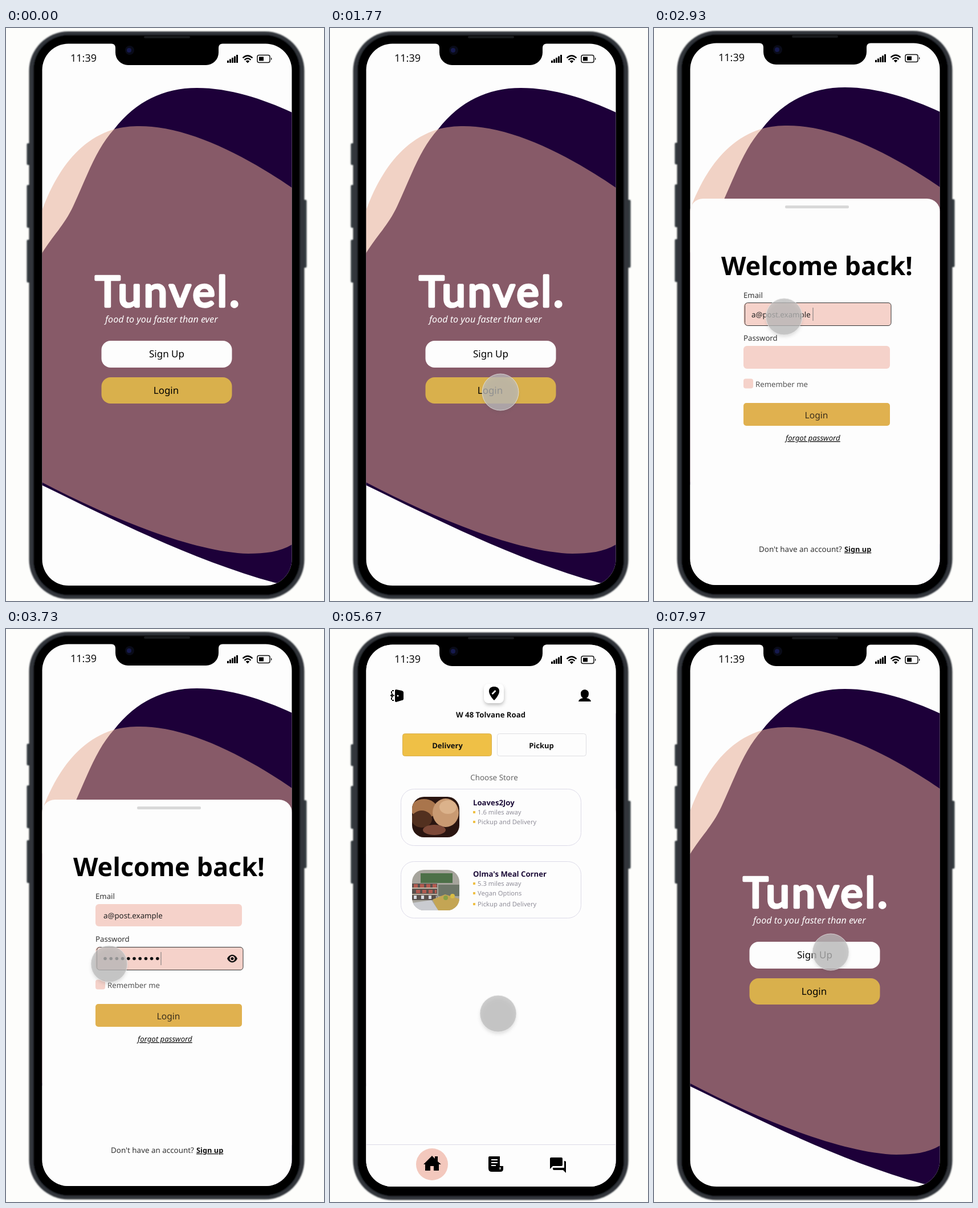
An HTML page that plays this animation: 558 px wide and 1004 px high, repeating every 8000 ms.

```html
<!DOCTYPE html>
<html lang="en">
<head>
<meta charset="utf-8">
<title>Food app prototype</title>
<style>
  html, body { margin: 0; width: 100%; height: 100%; overflow: hidden; background: #fdfdfb; }
  svg { display: block; width: 100%; height: 100%; }
  text { font-family: "Noto Sans", "Open Sans", sans-serif; text-rendering: geometricPrecision; }
  .mid { text-anchor: middle; }
  .semi { font-weight: 600; }
  .bold { font-weight: 700; }
  .ital { font-style: italic; }
  .line { text-decoration: underline; }
  .logo { font: 400 74px Lato, "Open Sans", sans-serif; letter-spacing: 4px; stroke: #fff; stroke-width: 4.5; stroke-linejoin: round; }
</style>
</head>
<body>
<svg viewBox="0 0 558 1004" preserveAspectRatio="none">
  <defs>
    <clipPath id="screenClip"><rect x="63.5" y="27.5" width="438" height="949.5" rx="46"/></clipPath>
    <clipPath id="breadClip"><rect x="144" y="294" width="83" height="71" rx="21"/></clipPath>
    <clipPath id="shelfClip"><rect x="144" y="422" width="83" height="71" rx="21"/></clipPath>
    <filter id="soft" x="-50%" y="-50%" width="200%" height="200%"><feGaussianBlur stdDeviation="3"/></filter>
    <filter id="edge"><feGaussianBlur stdDeviation=".8"/></filter>
  </defs>

  <g id="phone">
    <g filter="url(#edge)">
      <g fill="#343a3f">
        <rect x="36.500" y="202" width="8" height="38" rx="2"/>
        <rect x="36.500" y="275" width="8" height="75" rx="2"/>
        <rect x="36.500" y="371" width="8" height="75" rx="2"/>
        <rect x="519.500" y="301" width="8" height="119" rx="2"/>
      </g>
      <rect x="40.500" y="6" width="483" height="994.500" rx="69" fill="#30363b"/>
      <rect x="48" y="12" width="468" height="982" rx="62"/>
    </g>
    <rect x="63.5" y="27.5" width="438" height="949.5" rx="46" fill="#fdfdfd"/>

    <g clip-path="url(#screenClip)">
      <g id="splash">
        <path fill="#1d0039" d="M63 395C82 364 102 346 118 312C143 258 158 212 190 177C228 128 278 105 335 105C392 105 450 124 502 148V978L472 972C330 933 190 863 63 801Z"/>
        <path fill="#e6ab93" fill-opacity=".525" d="M63 320C84 262 122 198 188 178C204 173 220 172 235 172C320 172 420 224 502 280V905C480 918 455 921 425 921C330 918 190 862 63 796Z"/>
        <text class="mid logo" x="285" y="488" fill="#fff">Tunvel.</text>
        <text class="ital" x="174" y="516" font-size="16.1" fill="#fff">food to you faster than ever</text>
        <rect x="167.500" y="548" width="229" height="47" rx="16" fill="#fdfdfd"/>
        <rect x="167.500" y="612" width="229" height="46" rx="16" fill="#d9b04c"/>
        <g class="mid" font-size="17"><text x="282" y="577">Sign Up</text><text x="281" y="641">Login</text></g>
      </g>

      <g id="sheet">
        <rect x="63" y="300" width="439" height="720" rx="23" fill="#fdfdfd"/>
        <rect x="230" y="312" width="112" height="5" rx="2" fill="#d8d8d8"/>
        <text class="bold mid" x="286" y="434" font-size="45">Welcome back!</text>
        <g fill="#f5d2ca">
          <rect x="157" y="483" width="257" height="39" rx="6"/>
          <rect x="157" y="558" width="257" height="40" rx="6"/>
          <rect x="157" y="615.5" width="17" height="17" rx="4"/>
        </g>
        <g font-size="13.2" fill="#333">
          <text x="157" y="474">Email</text>
          <text x="157" y="549">Password</text>
          <text x="178" y="630" fill="#555">Remember me</text>
          <text x="184" y="919" font-size="13.4">Don't have an account?</text>
          <text class="bold line" x="334" y="919" font-size="12.8" fill="#111">Sign up</text>
          <text class="ital line" x="231" y="724" fill="#111">forgot password</text>
        </g>
        <rect x="157" y="658" width="257" height="40" rx="5" fill="#e0b14f"/>
        <text class="mid" x="285" y="685" font-size="15.6" fill="#3b2f1c">Login</text>
        <rect id="focus" x="159.5" width="256.5" height="40" rx="5" fill="#f5d2ca" stroke="#333"/>
        <text id="email" x="171" y="508" font-size="13.3" fill="#222">a@post.example</text>
        <g id="secret">
          <g id="dots"></g>
          <path fill="#111" fill-rule="evenodd" d="M388 578.5C392 569.500 402 569.500 406 578.5C402 587.500 392 587.500 388 578.5ZM392.500 578.5a4.500 4.500 0 1 0 9 0a4.500 4.500 0 1 0-9 0Z"/>
          <circle cx="397" cy="578.5" r="2.6" fill="#111"/>
        </g>
        <path id="caret" stroke="#777"/>
        <path id="check" fill="none" stroke="#222" stroke-width="1.8" d="M158 616.500h15v15h-15ZM160.500 619l10 10M170.500 619l-10 10"/>
      </g>

      <g id="home">
        <rect x="63" y="27" width="439" height="950" fill="#fdfdfd"/>
        <path d="M116 106l10 2q3 1 3 3v11q0 3-3 3l-10 3q-2 0-2-2v-18q0-2 2-2Z"/>
        <path fill="none" stroke="#000" stroke-width="2" d="M112 108h-3M108 109v4M108 120v4M109 125h3M113 116.500h-6M110 113.500l-3 3l3 3"/>
        <circle cx="119" cy="117" r="1.5" fill="#fff"/>
        <rect x="271" y="100" width="34" height="33" rx="8" fill="#777" opacity=".5" filter="url(#soft)"/>
        <rect x="270" y="96" width="35" height="34" rx="8" fill="#fff"/>
        <path d="M288 125C274 111 278 101 288 101S302 111 288 125Z"/>
        <path stroke="#fff" stroke-width="2.6" d="M284.500 114l6-6"/>
        <path d="M440 113c0-9 14-9 14 0q0 6-4 8q7 1 8 6h-22q1-5 8-6q-4-2-4-8Z"/>
        <text class="semi mid" x="282" y="155" font-size="13.2" fill="#111">W 48 Tolvane Road</text>
        <rect x="127.500" y="183.500" width="156" height="39" rx="4" fill="#efc046" stroke="#d9b04c"/>
        <rect x="293.500" y="183.500" width="156" height="39" rx="4" fill="#fdfdfd" stroke="#dedee2"/>
        <g class="semi mid" font-size="13" fill="#111"><text x="206" y="209">Delivery</text><text x="371" y="209">Pickup</text></g>
        <text class="mid" x="288" y="265" font-size="13.4" fill="#666">Choose Store</text>
        <g fill="#fdfdfd" stroke="#dcdae8">
          <rect x="124.500" y="280.500" width="316" height="99" rx="23"/>
          <rect x="124.500" y="407.500" width="316" height="99" rx="23"/>
          <path d="M63 903.500h439"/>
        </g>
        <g clip-path="url(#breadClip)">
          <rect x="144" y="294" width="83" height="71" fill="#2a1510"/>
          <ellipse cx="165" cy="315" rx="23" ry="17" fill="#a9754c"/>
          <ellipse cx="161" cy="333" rx="18" ry="15" fill="#52301f"/>
          <ellipse cx="203" cy="322" rx="23" ry="25" fill="#c99a72"/>
          <ellipse cx="207" cy="312" rx="15" ry="12" fill="#dbb28b"/>
          <ellipse cx="183" cy="352" rx="20" ry="9" fill="#7d4938"/>
        </g>
        <g clip-path="url(#shelfClip)">
          <rect x="144" y="422" width="83" height="71" fill="#a6a49c"/>
          <rect x="159" y="428" width="56" height="17" fill="#4d7048"/>
          <rect x="144" y="446" width="44" height="29" fill="#59504c"/>
          <path stroke="#c4b9a8" stroke-width="2" d="M144 454h44M144 465h44"/>
          <path stroke="#b35b50" stroke-width="6" stroke-dasharray="7 4" d="M147 450h40M151 460h36"/>
          <path stroke="#d7d9e0" stroke-width="6" stroke-dasharray="5 8" d="M147 470h40"/>
          <rect x="190" y="448" width="37" height="20" fill="#6d7669"/>
          <path fill="#c4a554" d="M180 474l22-9l25 8v20h-38Z"/>
          <path fill="#c9cbd0" d="M144 480l34-5l12 18h-46Z"/>
          <circle cx="203" cy="471" r="4" fill="#88a046"/><circle cx="215" cy="468" r="4" fill="#d9bd45"/>
        </g>
        <g class="semi" font-size="13.2" fill="#1c0c38">
          <text x="251" y="309">Loaves2Joy</text>
          <text x="251" y="434">Olma's Meal Corner</text>
        </g>
        <g id="details" font-size="11.2" fill="#92909b"></g>
        <circle cx="179" cy="938" r="28" fill="#f3c8bd"/>
        <path d="M164 938l15-15l5 5v-4h5v9l6 5h-4v11h-9v-8h-6v8h-9v-11Z"/>
        <path d="M280 924h18v17h6v5q0 5-5 5h-15q-6 0-6-6v-19q0-2 2-2Z"/>
        <path stroke="#fff" stroke-width="2" d="M283 930h11M283 935h11M283 940h8"/>
        <path stroke="#fff" stroke-width="1.500" d="M298.500 943v4"/>
        <path d="M388 926h18q2 0 2 2v11q0 2-2 2h-15l-5 5v-18q0-2 2-2ZM411 932q3 0 3 2v19l-5-5h-16q-2 0-2-2v-2h20Z"/>
      </g>
    </g>

    <path d="M185 27q7 1 7 8v8a22 22 0 0 0 22 22h137a22 22 0 0 0 22-22v-8q0-7 7-8Z"/>
    <rect x="242" y="14" width="81" height="4" rx="2" fill="#181a1c"/>
    <circle cx="217" cy="39" r="8" fill="#090b18"/><circle cx="216" cy="39" r="4" fill="#15194d"/>

    <text x="113" y="59" font-size="18" fill="#111">11:39</text>
    <path d="M388 57h3v4h-3ZM392 54.500h3v6.500h-3ZM396 52h3v9h-3ZM400 49.500h3v11.500h-3ZM404 47h3v14h-3Z"/>
    <path fill="none" stroke="#000" stroke-width="2.400" d="M415.500 52.500q8.500-8 17 0M418.500 55.800q5.500-5 11 0"/>
    <path d="M420.700 58q3.300-2.500 6.600 0l-3.300 3.500Z"/>
    <rect x="441" y="47.500" width="22" height="13" rx="3" fill="none" stroke="#111" stroke-width="1.500"/>
    <path d="M444 50.500h8v7h-8ZM465 51.500q3 2.500 0 5Z"/>
  </g>

  <g id="cursor">
    <circle cy="4" r="31" fill="#555" opacity=".2" filter="url(#soft)"/>
    <circle r="32" fill="#bdbdbd" fill-opacity=".74" stroke="#eee" stroke-opacity=".7"/>
  </g>
</svg>
<script>
const LOOP = 8000;
const OPEN = 1800, EMAIL = 2750, PASSWORD = 3300, CHECK = 4250, ENTER = 5430, RESTART = 7400;
const $ = id => document.getElementById(id);
const clamp = v => Math.max(0, Math.min(1, v));
const smooth = v => v * v * (3 - 2 * v);
const show = (id, on) => $(id).setAttribute("display", on ? "inline" : "none");

// time, x, y of the touch point
const PATH = [
  [1700, 299, 638], [2300, 299, 638], [2620, 230, 503], [2900, 230, 503],
  [3180, 181, 587], [3800, 181, 587], [4100, 167, 623], [4960, 167, 623],
  [5280, 295, 674], [RESTART, 295, 674], [RESTART, 310, 566], [LOOP, 310, 566]
];

$("dots").innerHTML = Array.from({ length: 10 }, (_, i) =>
  `<circle cx="${174 + i * 10.2}" cy="578.5" r="2.8" fill="#111"/>`).join("");

$("details").innerHTML = [
  [325, "1.6 miles away"], [342, "Pickup and Delivery"],
  [450, "5.3 miles away"], [467, "Vegan Options"], [486, "Pickup and Delivery"]
].map(([y, s]) =>
  `<rect x="251" y="${y - 6}" width="4" height="4" fill="#efc046"/><text x="259" y="${y}">${s}</text>`).join("");

function touchAt(t) {
  let i = 0;
  while (i < PATH.length - 2 && t >= PATH[i + 1][0]) i++;
  const [t0, x0, y0] = PATH[i], [t1, x1, y1] = PATH[i + 1];
  const k = smooth(clamp((t - t0) / (t1 - t0)));
  return [x0 + (x1 - x0) * k, y0 + (y1 - y0) * k];
}

function draw(t) {
  const inLogin = t >= OPEN && t < RESTART;
  const fade = t < RESTART ? clamp((t - ENTER) / 180) : 0;
  const rise = 1 - Math.pow(1 - clamp((t - OPEN) / 270), 3);
  const onPassword = t >= PASSWORD;

  $("phone").setAttribute("transform", `translate(0 ${inLogin && fade < 1 ? -1 : 0})`);
  show("sheet", inLogin);
  $("sheet").setAttribute("transform", `translate(0 ${(1 - rise) * 690})`);
  show("home", fade > 0);
  $("home").setAttribute("opacity", fade);

  show("email", t >= EMAIL);
  show("secret", onPassword);
  show("focus", t >= EMAIL);
  show("caret", t >= EMAIL);
  $("focus").setAttribute("y", onPassword ? 558.5 : 482.5);
  $("caret").setAttribute("d", onPassword ? "M272 567v23" : "M279 491v23");
  show("check", t >= CHECK);

  show("cursor", t >= PATH[0][0]);
  $("cursor").setAttribute("transform", `translate(${touchAt(t)})`);
}

const start = performance.now();
function tick() {
  draw((performance.now() - start) % LOOP);
  requestAnimationFrame(tick);
}
tick();
</script>
</body>
</html>
```
